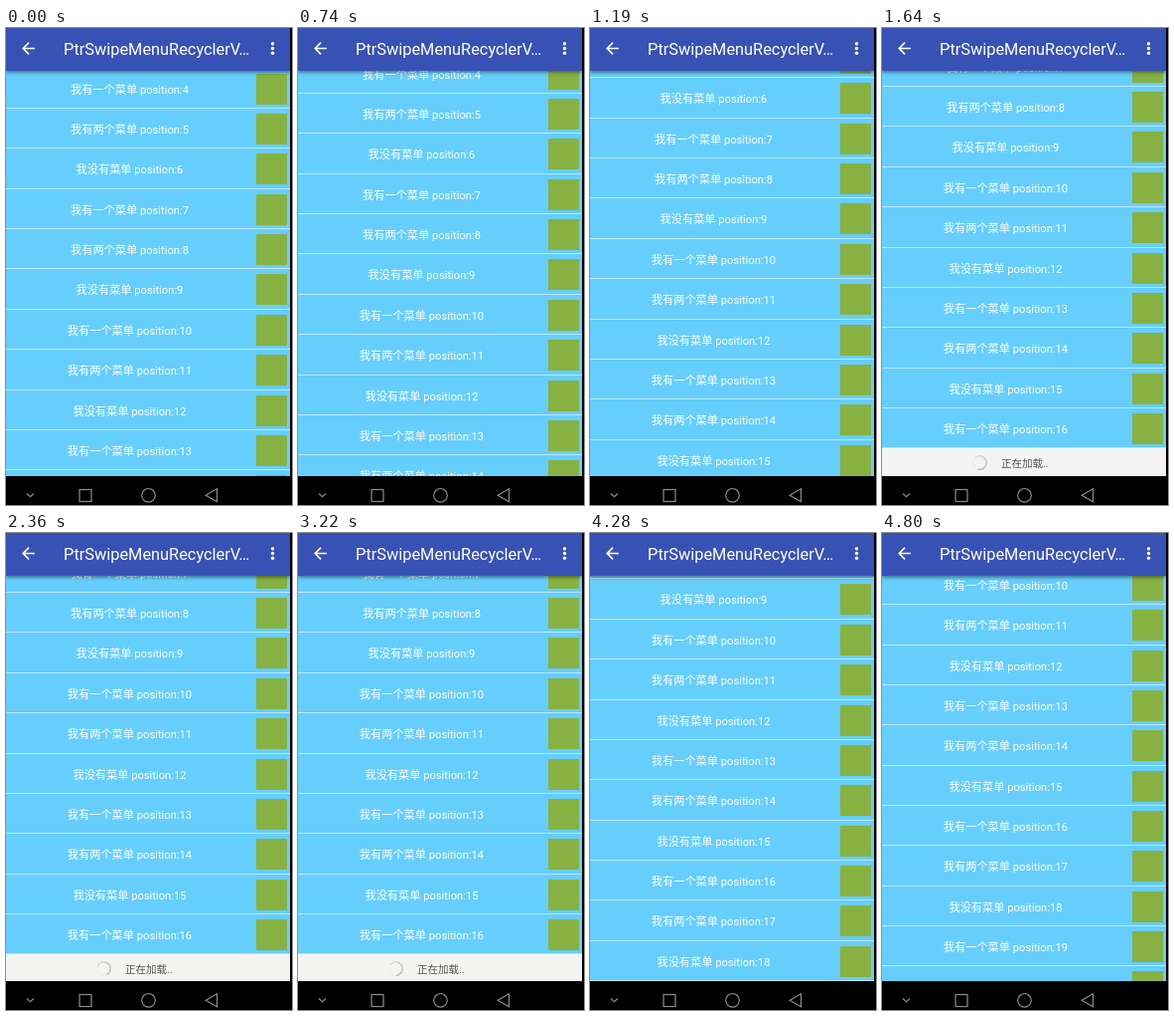
Write an HTML page that moves like this. It is 288 by 479 pixels and loops after 5680 ms.

```html
<!DOCTYPE html>
<html lang="zh-CN">
<head>
<meta charset="utf-8">
<title>Recycler list</title>
<style>
html, body { margin: 0; width: 100%; height: 100%; overflow: hidden; background: #000; }
#stage {
  position: relative; width: 288px; height: 479px; overflow: hidden; background: #000;
  font-family: Roboto, "Noto Sans CJK SC", "Noto Sans CJK", sans-serif;
}
#view { position: absolute; left: 0; top: 0; width: 286px; height: 450px; overflow: hidden; background: #66cefc; }
#list { position: absolute; left: 0; top: 0; width: 286px; height: 740px; animation: scroll 5680ms infinite; }
.row {
  position: absolute; left: 0; width: 286px; height: 40.36px; box-sizing: border-box;
  border-bottom: 1px solid #bfe6f8; background: #66cefc;
}
.row span {
  position: absolute; left: 0; top: 0; width: 249px; text-align: center; white-space: pre;
  font-size: 11.2px; line-height: 43px; color: #fff;
}
.row i { position: absolute; left: 252px; top: 5px; width: 31px; height: 31px; background: #87b142; }

#loader {
  position: absolute; left: 0; width: 286px; height: 40px; background: #f4f4f2;
  animation: load 5680ms step-end infinite;
}
#loader span { position: absolute; left: 120px; top: 0; font-size: 10.5px; line-height: 31px; color: #555; }
#ring {
  position: absolute; left: 91px; top: 7px; width: 15px; height: 15px; border-radius: 50%;
  background: conic-gradient(from -50deg, #d8d8d6, #9b9b9b 230deg, #e9e9e7 240deg, #eeeeec);
  -webkit-mask: radial-gradient(circle, transparent 5.9px, #000 6.4px);
  mask: radial-gradient(circle, transparent 5.9px, #000 6.4px);
  animation: spin 811.43ms linear infinite;
}
#bar {
  position: absolute; left: 0; top: 0; width: 286px; height: 43px; background: #3851b5;
  box-shadow: 0 2px 3px rgba(0, 0, 0, .38);
}
#bar span { position: absolute; left: 58px; font-size: 16.35px; line-height: 43px; color: #fff; white-space: pre; }
svg { position: absolute; left: 0; top: 0; }

/* Finger drag to the end, wait for more rows, then a fling. */
@keyframes scroll {
  0% { transform: translateY(0); animation-timing-function: step-end; }
  10.387% { transform: translateY(-3px); animation-timing-function: steps(4); }
  13.028% { transform: translateY(-15px); animation-timing-function: steps(12); }
  20.95% { transform: translateY(-71px); animation-timing-function: steps(12); }
  28.873% { transform: translateY(-143px); animation-timing-function: step-end; }
  30.8% { transform: translateY(-142px); animation-timing-function: step-end; }
  69.19% { transform: translateY(-146px); animation-timing-function: steps(4); }
  71.831% { transform: translateY(-166px); animation-timing-function: steps(5); }
  75.352% { transform: translateY(-196px); animation-timing-function: steps(6); }
  79.313% { transform: translateY(-228px); animation-timing-function: steps(4); }
  81.866% { transform: translateY(-243px); animation-timing-function: steps(4); }
  84.507%, 100% { transform: translateY(-251px); }
}
@keyframes load {
  0% { visibility: visible; }
  59.15%, 100% { visibility: hidden; }
}
@keyframes spin { to { transform: rotate(360deg); } }
</style>
</head>
<body>
<div id="stage">
  <div id="view">
    <div id="list"></div>
    <div id="bar"><span>PtrSwipeMenuRecyclerV…</span></div>
  </div>
  <svg width="288" height="479" viewBox="0 0 288 479" fill="none">
    <path transform="translate(12.9 10.9) scale(.8)" fill="#fff"
      d="M20 11H7.8l5.6-5.6L12 4l-8 8 8 8 1.4-1.4L7.8 13H20z"/>
    <g fill="#fff">
      <circle cx="268.5" cy="15.7" r="1.7"/>
      <circle cx="268.5" cy="20.5" r="1.7"/>
      <circle cx="268.5" cy="25.3" r="1.7"/>
    </g>
    <g stroke="#8c8c8c" stroke-width="1.2">
      <path d="M21 467.5l3.5 3.2 3.5-3.2"/>
      <rect x="74" y="463.5" width="12" height="12"/>
      <circle cx="143.5" cy="469.3" r="6.8"/>
      <path d="M212.5 462.8v13l-11.3-6.5z"/>
    </g>
  </svg>
</div>
<script>
const TOP = 40.64, PITCH = 40.36, FIRST = 4, LAST = 20;
const list = document.getElementById('list');
const labels = ['我没有菜单', '我有一个菜单', '我有两个菜单'];

function add(html, id, pos) {
  const el = document.createElement('div');
  if (id) el.id = id; else el.className = 'row';
  el.style.top = TOP + (pos - FIRST) * PITCH + 'px';
  el.innerHTML = html;
  list.append(el);
}

for (let p = FIRST; p <= LAST; p++) {
  add(`<span>${labels[p % 3]} position:${p}</span><i></i>`, '', p);
}
add('<div id="ring"></div><span>正在加载..</span>', 'loader', 17);
</script>
</body>
</html>
```
